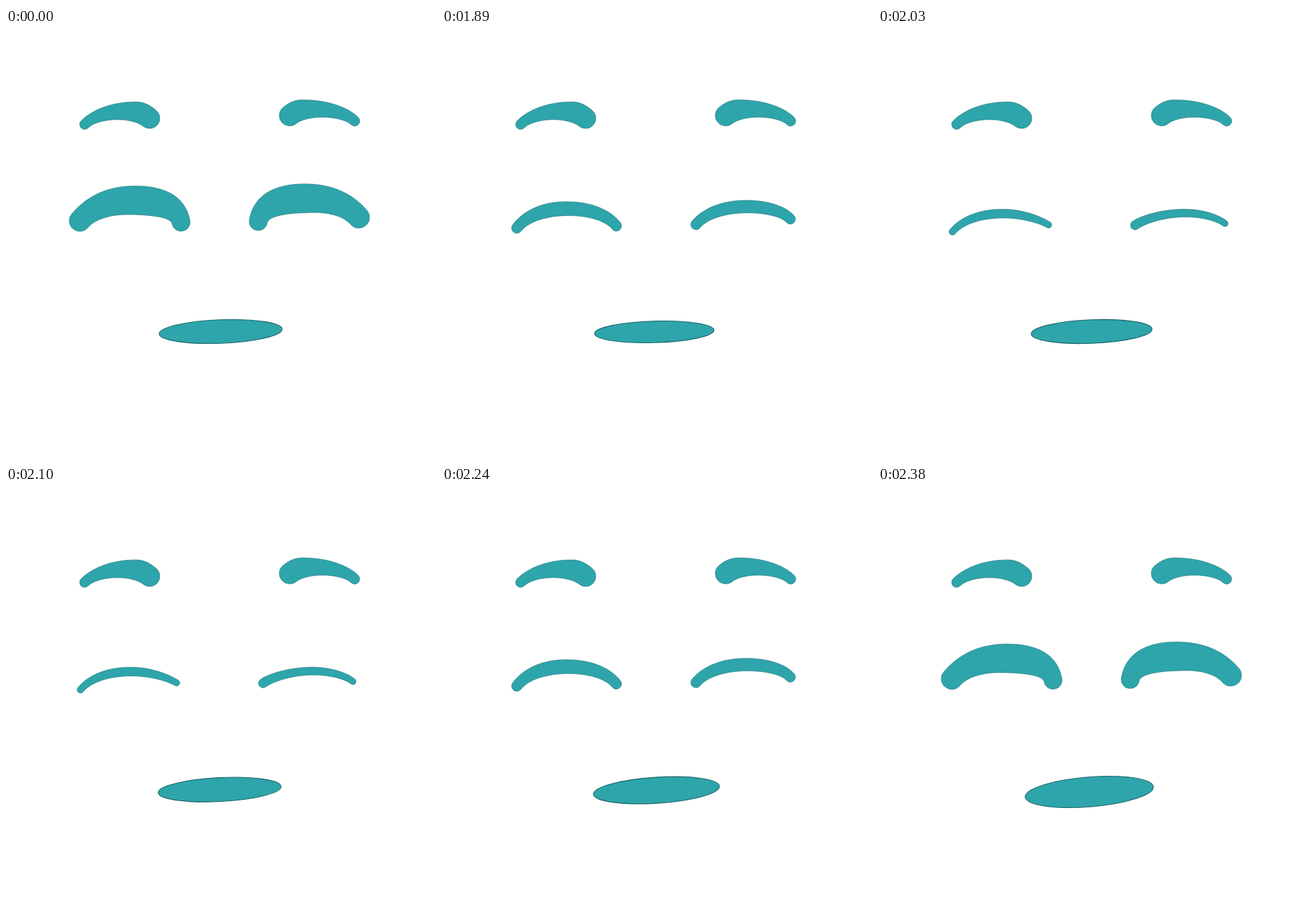
These frames come from a looping animation (629x629 px, 3.15 s). An HTML page with a canvas:

```html
<!DOCTYPE html>
<html lang="en">
<head>
<meta charset="utf-8">
<title>Blinking face</title>
<style>
html, body { margin: 0; width: 100%; height: 100%; overflow: hidden; background: #fff; }
canvas { display: block; }
</style>
</head>
<body>
<canvas id="stage" width="629" height="629"></canvas>
<script>
const SIZE = 629, LOOP = 3150, BLINK_AT = 1820, STEP = 70, LAST = 9;
const FILL = '#2da5ab', EDGE = '#1d6468';
const ctx = document.getElementById('stage').getContext('2d');

// Crescent: left tip x, y, radius, lean; right tip likewise; outer peak x, y; inner peak x, y
const leftBrow = crescent(115, 141, 7.3, 45, 210, 132, 15, 50, 190, 108, 163, 134);
const rightBrow = crescent(415, 128, 15.3, 50, 510, 136, 7.5, 45, 434, 105, 462, 130.5);

// Eye poses from wide open to nearly shut
const leftEye = [
  crescent(108, 282, 15.5, 40, 256, 284, 13.3, 10, 189, 231, 177, 273),
  crescent(108, 287, 12.5, 36, 255.5, 284, 12.8, 20, 188, 243, 186, 275),
  crescent(109.5, 292.5, 7.8, 38, 255, 289.5, 7.7, 38, 182, 254, 185, 274.5),
  crescent(110.5, 296, 5.5, 20, 251.5, 292.5, 5.3, 20, 182, 261, 183, 277),
  crescent(109, 298, 5, 40, 249.5, 288, 4.7, 58, 182, 265, 183, 278)
];
const rightEye = [
  crescent(369, 283, 13.3, 10, 516, 277, 15.8, 40, 437, 228, 452, 270),
  crescent(368, 281, 15, 50, 517, 277.5, 15.3, 35, 441, 238, 457, 271),
  crescent(371.5, 287.5, 7.6, 40, 509.5, 279.5, 7.5, 40, 445, 252, 447, 270.5),
  crescent(372, 293.5, 5.3, 20, 509.8, 285, 5.2, 30, 448, 260, 449, 274.5),
  crescent(376, 288.5, 6.7, 55, 507.5, 286, 4.6, 50, 448, 265, 450, 276.5)
];

// step, then centre x, centre y, radius x, radius y, tilt
const mouthKeys = [
  [0, 314, 444, 90, 17.2, 0.039],
  [1, 311, 445, 87, 15.8, 0.029],
  [2, 310.5, 444.5, 87.3, 15.8, 0.029],
  [4, 312.5, 444, 88.5, 17.2, 0.04],
  [6, 312.5, 444.2, 91.5, 17.7, 0.06],
  [8, 315, 446, 93, 20.4, 0.066],
  [9, 309, 447.5, 94, 21.8, 0.08]
];

function crescent(lx, ly, lr, lLean, rx, ry, rr, rLean, ox, oy, ix, iy) {
  const path = new Path2D();
  const a = lLean * Math.PI / 180, b = rLean * Math.PI / 180;

  // Point on a tip's rim and the handle that leaves it along the tangent
  const rim = (x, y, r, lean, side, out, peakY) => {
    const px = x + side * out * r * Math.cos(lean);
    const py = y - out * r * Math.sin(lean);
    const len = 0.8 * (py - peakY);
    return { x: px, y: py, hx: px - side * len * Math.sin(lean), hy: py - len * Math.cos(lean) };
  };
  const arch = (from, to, x, y) => {
    const near = p => x + (p.x - x) * 0.45;
    path.bezierCurveTo(from.hx, from.hy, near(from), y, x, y);
    path.bezierCurveTo(near(to), y, to.hx, to.hy, to.x, to.y);
  };

  const start = rim(lx, ly, lr, a, -1, 1, oy);
  path.moveTo(start.x, start.y);
  arch(start, rim(rx, ry, rr, b, 1, 1, oy), ox, oy);
  path.arc(rx, ry, rr, -b, Math.PI - b);
  arch(rim(rx, ry, rr, b, 1, -1, iy), rim(lx, ly, lr, a, -1, -1, iy), ix, iy);
  path.arc(lx, ly, lr, a, Math.PI + a);
  path.closePath();
  return path;
}

function mouthAt(step) {
  const next = Math.max(1, mouthKeys.findIndex(k => k[0] >= step));
  const a = mouthKeys[next - 1], b = mouthKeys[next];
  const u = (step - a[0]) / (b[0] - a[0]);
  const [, x, y, rx, ry, tilt] = a.map((v, i) => v + (b[i] - v) * u);
  const path = new Path2D();
  path.ellipse(x, y, rx, ry, -tilt, 0, Math.PI * 2);
  return path;
}

function paint(path, edgeWidth) {
  ctx.fillStyle = FILL;
  ctx.fill(path);
  ctx.strokeStyle = EDGE;
  ctx.lineWidth = edgeWidth;
  ctx.stroke(path);
}

function draw(now) {
  const t = now % LOOP;
  const step = t < BLINK_AT ? 0 : Math.min(LAST, 1 + Math.floor((t - BLINK_AT) / STEP));
  const pose = Math.min(step, LAST - step);
  ctx.fillStyle = '#fff';
  ctx.fillRect(0, 0, SIZE, SIZE);
  [leftBrow, rightBrow, leftEye[pose], rightEye[pose]].forEach(p => paint(p, 0.5));
  paint(mouthAt(step), 1.1);
}

const began = performance.now();
function tick() {
  draw(performance.now() - began);
  requestAnimationFrame(tick);
}
tick();
</script>
</body>
</html>
```
